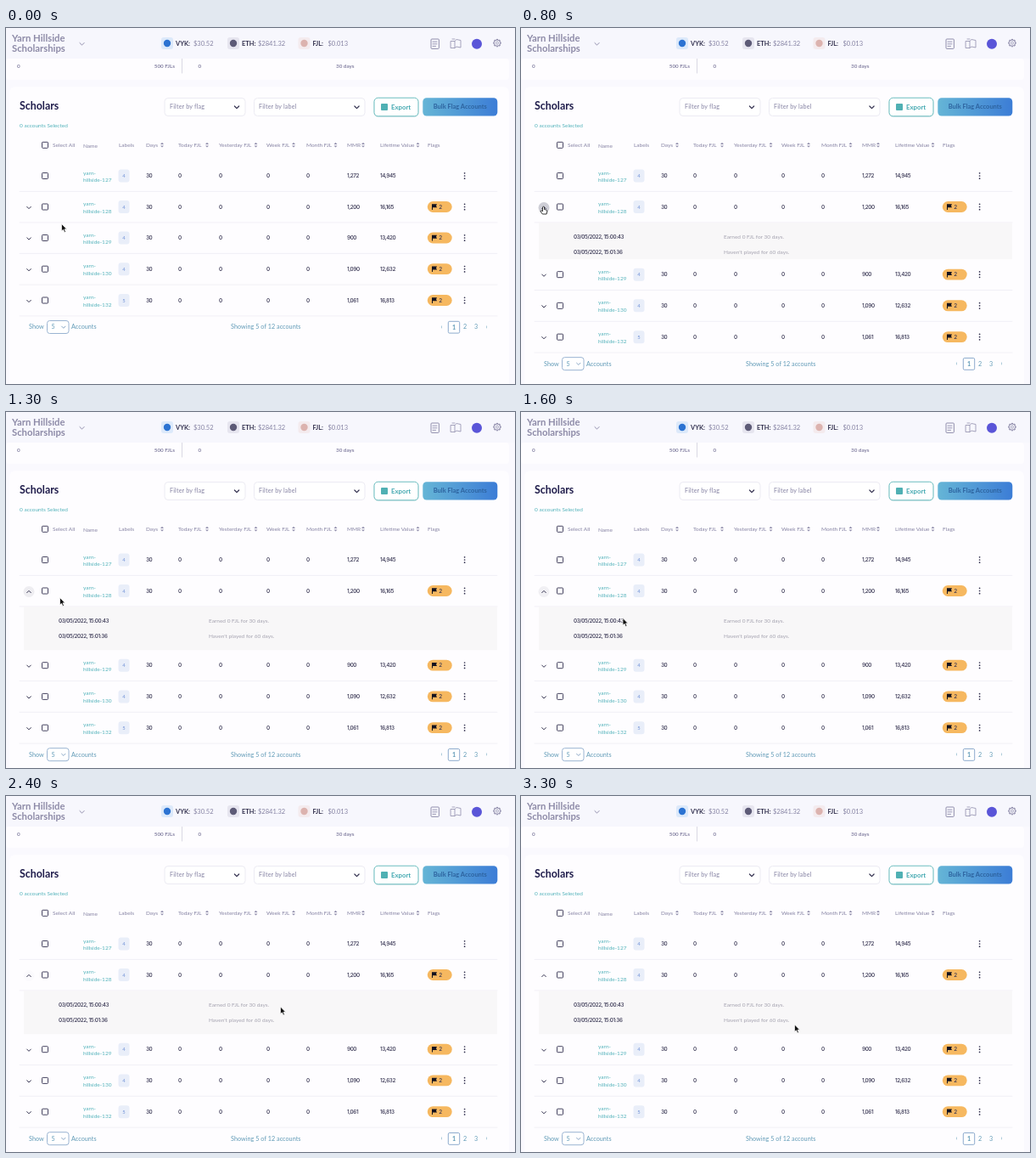
These frames come from a looping animation (600x419 px, 3.6 s). An HTML page:

```html
<!DOCTYPE html>
<html lang="en">
<head>
<meta charset="utf-8">
<title>Scholars table</title>
<style>
html, body { margin: 0; width: 100%; height: 100%; overflow: hidden; background: #faf9fe; }
svg { display: block; }
text { font-family: Lato, sans-serif; font-size: 6.5px; fill: #8582a3; white-space: pre; }
.b { font-weight: 700; }
.num { font: 500 6.4px Inter, sans-serif; letter-spacing: -.4px; fill: #33314f; }
.teal { fill: #52b2ba; }
.foot { font-size: 7.2px; fill: #5f9ab6; letter-spacing: .05px; }
.line { fill: none; stroke-linecap: round; stroke-linejoin: round; }
</style>
</head>
<body>
<svg id="stage" width="100%" height="100%" viewBox="0 0 600 419"></svg>
<script>
const INK = '#33314f', MUTED = '#918eac', RULE = '#eeecf4';

const text = (x, y, s, cls = '', attrs = '') => `<text x="${x}" y="${y}" class="${cls}" ${attrs}>${s}</text>`;
const box = (x, y, w, h, r, fill, stroke = 'none', sw = 1) =>
  `<rect x="${x}" y="${y}" width="${w}" height="${h}" rx="${r}" fill="${fill}" stroke="${stroke}" stroke-width="${sw}"/>`;
const dot = (x, y, r, fill) => `<circle cx="${x}" cy="${y}" r="${r}" fill="${fill}"/>`;
const line = (d, color = MUTED, w = 1) => `<path class="line" d="${d}" stroke="${color}" stroke-width="${w}"/>`;
const chevron = (x, y, r = 2.3, color = INK, w = 1) => line(`M${x - r} ${y - r / 2}l${r} ${r}l${r} ${-r}`, color, w);
const rule = y => line(`M16 ${y}H579`, RULE, .8);
const checkbox = y => box(42.5, y - 3.5, 7, 7, .8, 'none', '#45435f');
const sorter = x => `<path d="M${x - 2} 137l2-2.2l2 2.2zM${x - 2} 138.4l2 2.2l2-2.2z" fill="${MUTED}"/>`;

function coin(x, name, price, priceX, tint, color) {
  return box(x, 11, 14, 14, 3, tint) + dot(x + 7, 18, 4.2, color) +
    text(x + 17, 21, name + ':', 'b', `style="font-size:7.4px;fill:${INK}"`) +
    text(priceX, 21, price, '', 'style="font-size:7.5px"');
}

function topBar() {
  const title = 'style="font-size:11.3px;fill:#8d8aa7"';
  const gear = [...Array(8)].map((_, i) =>
    `<path d="M579 12.9v2" stroke="${MUTED}" stroke-width="2.2" transform="rotate(${i * 45} 579 17.6)"/>`).join('');
  return box(0, 0, 600, 36, 0, '#f7f7fd') +
    text(7, 16, 'Yarn Hillside', 'b', title) + text(7, 28, 'Scholarships', 'b', title) +
    chevron(89.5, 18.8, 2.6, MUTED) +
    coin(183, 'VYK', '$30.52', 221, '#dce9fa', '#2c73d2') +
    coin(261, 'ETH', '$2841.32', 297, '#e6e5ef', '#5d5b77') +
    coin(344.5, 'FJL', '$0.013', 379.5, '#f4ebee', '#dcb3af') +
    box(501, 13, 9.4, 11.4, 1, 'none', MUTED) + line('M503 16.2h5M503 18.8h5M503 21.4h3.5', MUTED, .9) +
    line('M524.5 15.5h4.5v8h-4.5zM529 23.5l2-1.5l5 1V14.5l-5-1l-2 2M526 13h3', MUTED, .8) +
    dot(555, 18.8, 6, '#5a55d8') +
    gear + `<circle cx="579" cy="17.6" r="3.6" fill="#f7f7fd" stroke="${MUTED}" stroke-width=".9"/>` +
    `<circle cx="579" cy="17.6" r="1.5" fill="none" stroke="${MUTED}" stroke-width=".8"/>`;
}

function summary() {
  const small = 'style="font-size:6.3px"';
  return box(0, 36, 593, 25, 4, '#fefdff') + line('M207.5 36V53', '#d9d8e3') +
    text(13, 46.6, '0', 'b', small) + text(199, 46.6, '500 FJLs', 'b', small + ' text-anchor="end"') +
    text(226.5, 46.6, '0', 'b', small) + text(389, 46.6, '30 days', 'b', small);
}

function toolbar() {
  const label = 'style="font-size:7.2px;letter-spacing:.15px"';
  return text(16, 96.3, 'Scholars', 'b', 'style="font-size:12.4px;fill:#1f1c4b"') +
    text(16, 116.6, '0 accounts Selected', 'teal') +
    box(187, 82.5, 95, 21, 4, '#fff', '#ecebf3') + text(193, 95.2, 'Filter by flag', '', label) + chevron(272, 93.3, 2.6, INK, 1.2) +
    box(292.5, 82.5, 130.5, 21, 4, '#fff', '#ecebf3') + text(298, 95.2, 'Filter by label', '', label) + chevron(413.5, 93.3, 2.6, INK, 1.2) +
    box(433.5, 82.5, 53, 22.5, 5, '#dcebed') + box(434, 82.2, 52, 21.6, 4.5, '#fff', '#6bbdbf') +
    box(442, 89, 8, 8, 1, '#4fb0b3') + text(454, 95.5, 'Export', 'b', 'style="font-size:7.8px;fill:#46aab2"') +
    box(491.3, 82.3, 88, 21.3, 4.5, 'url(#blue)') +
    text(535.3, 95.4, 'Bulk Flag Accounts', 'b', 'text-anchor="middle" style="font-size:7.5px;fill:#2d639f"');
}

function tableHead() {
  const columns = [[133, 'Labels'], [165, 'Days', 184], [203, 'Today FJL', 237], [251, 'Yesterday FJL', 294.5], [307, 'Week FJL', 339],
    [354, 'Month FJL', 388.5], [402, 'MMR', 421], [441, 'Lifetime Value', 485.5], [497, 'Flags']];
  return checkbox(137.8) + text(55, 140.2, 'Select All') + text(91, 141, 'Name') +
    columns.map(([x, s, sortX]) => text(x, 140, s) + (sortX ? sorter(sortX) : '')).join('');
}

function row(y, id, label, mmr, value, flagged = true, arrow = true) {
  const base = y + 2.3;
  let out = checkbox(y) + text(91, y - 1.5, 'yarn-', 'teal') + text(91, y + 7.2, 'hillside-' + id, 'teal') +
    box(132.5, y - 7.5, 13, 15, 3, '#e9eef9') +
    text(139, y + 2, label, '', 'text-anchor="middle" style="font-size:5.8px;fill:#6d8fd6"') +
    text(165, base, '30', 'num') + [203, 251, 307, 354].map(x => text(x, base, '0', 'num')).join('') +
    text(402, base, mmr, 'num') + text(441, base, value, 'num') +
    [-3.2, 0, 3.2].map(d => dot(540.6, y + d, .85, INK)).join('') + rule(y + 18.4);
  if (flagged) out += box(496.8, y - 6.5, 28.9, 12.9, 6.45, '#f6b860') +
    `<path d="M502 ${y - 3.2}h6l-1 2l1 2h-5v2.6h-1z" fill="#15131f"/>` + text(510.3, base, '2', 'num');
  return out + (flagged && arrow ? chevron(27, y + 1) : '');
}

function footer() {
  return text(27, 354.4, 'Show', 'foot') + box(48.5, 344.5, 25.5, 15, 3, '#fff', '#9ab4d2') +
    text(53.5, 354.4, '5', 'foot') + chevron(67.8, 352.2, 2.2, '#7d9dbf', .9) +
    text(77, 354.4, 'Accounts', 'foot') + text(265, 354.4, 'Showing 5 of 12 accounts', 'foot') +
    text(512.5, 354.2, '‹', 'foot') + box(521.3, 345.3, 13.4, 13.8, 1.5, '#fff', '#8dabcd') +
    text(526, 354.6, '1', 'foot b') + text(539, 354.4, '2', 'foot') +
    text(552, 354.4, '3', 'foot') + text(565.5, 354.2, '›', 'foot');
}

const note = (y, date, message) =>
  text(62, y, date, 'num', 'style="font-size:6.3px;letter-spacing:-.35px"') + text(239, y, message, '', 'style="fill:#a5a3b0"');

const stage = document.getElementById('stage');
stage.innerHTML = `<defs><linearGradient id="blue"><stop stop-color="#65b5d6"/><stop offset="1" stop-color="#3c7dd6"/></linearGradient></defs>
  ${box(0, 0, 600, 419, 0, '#faf9fe')}${summary()}${topBar()}
  ${box(4, 69, 589, 360, 7, '#fefdff')}${toolbar()}${tableHead()}
  ${row(174, 127, 4, '1,272', '14,945', false)}${row(210.5, 128, 4, '1,200', '16,165', true, false)}
  <circle id="ripple" cx="27" cy="211.5" r="6.5" fill="#c9c9d1"/>
  <g id="toggle">${chevron(0, 0)}</g>
  <svg id="panel" y="229" width="600" height="0">
    ${box(21, 0, 558, 60, 0, '#f8f7f8')}
    ${note(18.8, '03/05/2022, 15:00:43', 'Earned 0 FJL for 30 days.')}
    ${note(36.8, '03/05/2022, 15:01:36', "Haven't played for 60 days.")}
  </svg>
  <g id="lower">${row(247, 129, 4, '900', '13,420')}${row(283.7, 130, 4, '1,090', '12,632')}
    ${row(320.5, 132, 5, '1,061', '16,813')}${footer()}</g>
  <path id="arrow" d="M0 0V8.6L2 6.8L3.4 10L4.9 9.3L3.5 6.3H6.1Z" fill="#111" stroke="#fff" stroke-width=".7"/>
  <path id="hand" d="M-1 .8Q0 -.4 1 .8V3.6L3.2 4.1Q4.5 4.5 4.3 6L3.6 9H-1.2L-3.5 5.8Q-3.3 4.4 -2 5L-1 5.9Z" fill="#fff" stroke="#222" stroke-width=".9"/>`;

const [ripple, toggle, panel, lower, arrow, hand] =
  ['ripple', 'toggle', 'panel', 'lower', 'arrow', 'hand'].map(id => document.getElementById(id));

// Keys are [time, ...values]; values are interpolated linearly.
function at(keys, t) {
  const i = keys.findIndex(k => k[0] > t);
  if (i < 0) return keys[keys.length - 1].slice(1);
  const a = keys[i - 1], b = keys[i], u = (t - a[0]) / (b[0] - a[0]);
  return a.slice(1).map((v, j) => v + (b[j + 1] - v) * u);
}

const pointerPath = [[0, 65.5, 230.5], [100, 40, 219], [200, 26.5, 210], [1000, 26.5, 210], [1100, 32, 212], [1300, 63.5, 218.5],
  [1600, 120, 242.5], [1800, 240, 245.5], [2000, 317.5, 246.5], [2200, 323.5, 248], [2500, 323.5, 248], [3100, 322.5, 269]];
const rippleFade = [[0, 0], [500, 0], [700, .2], [800, .9], [1300, .3], [2000, .15], [2600, 0]];
const LOOP = 3600, STEP = 100, OPEN_AT = 700;

function draw(now) {
  const t = Math.floor(now % LOOP / STEP) * STEP;
  const open = t > OPEN_AT ? 51.2 * (1 - Math.exp((OPEN_AT - t) / 54)) : 0;
  const [x, y] = at(pointerPath, t);
  const pressing = t >= 200 && t <= 1000;
  panel.setAttribute('height', open);
  lower.setAttribute('transform', `translate(0 ${open})`);
  toggle.setAttribute('transform', `translate(27 211.5) scale(1 ${open ? -1 : 1})`);
  ripple.setAttribute('opacity', at(rippleFade, t)[0]);
  for (const [el, shown] of [[arrow, !pressing], [hand, pressing]]) {
    el.setAttribute('transform', `translate(${x} ${y})`);
    el.style.display = shown ? '' : 'none';
  }
}

const start = performance.now();
function tick() {
  draw(performance.now() - start);
  requestAnimationFrame(tick);
}
tick();
</script>
</body>
</html>
```
